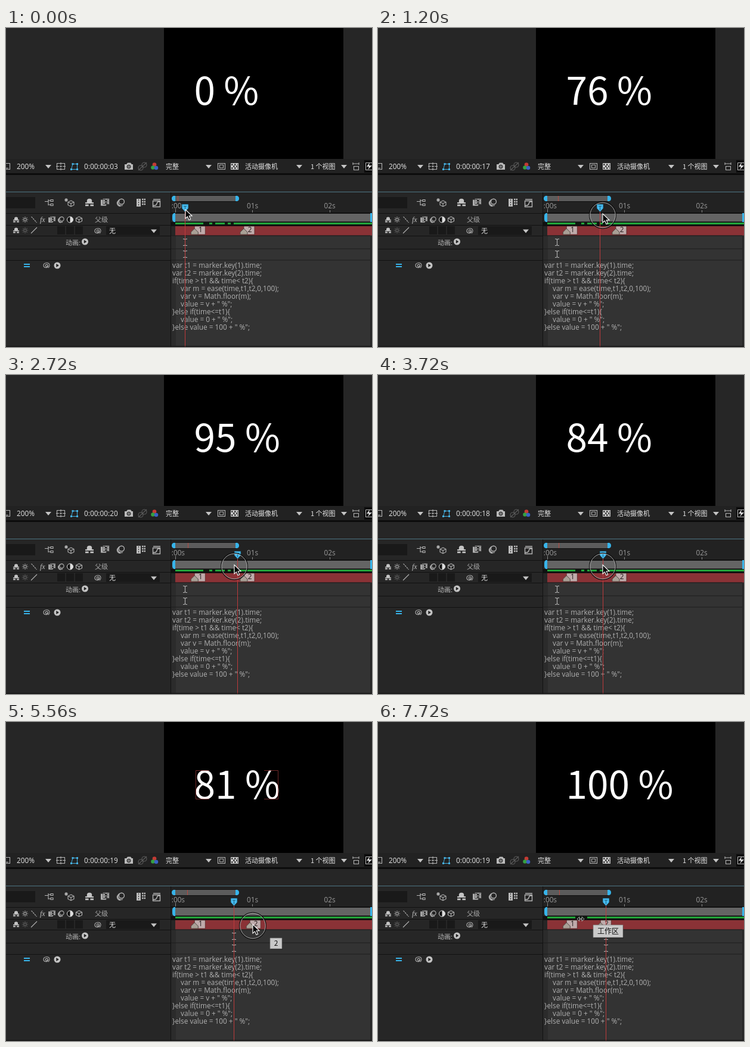
These frames come from a looping animation (614 by 536 pixels, 7760 ms). An HTML page:

```html
<!DOCTYPE html>
<html lang="zh">
<head>
<meta charset="utf-8">
<title>Marker driven counter</title>
<style>
html, body { margin: 0; width: 100%; height: 100%; overflow: hidden; background: #262626; }
svg { display: block; width: 614px; height: 536px; }
text { white-space: pre; }
.ui { font: 11.8px "Open Sans", "Noto Sans CJK SC", sans-serif; }
.cjk { font: 11px "Noto Sans CJK SC", sans-serif; }
.big { font: 64px "Noto Sans CJK SC", sans-serif; }
#bar text { font-weight: 500; }
.line { fill: none; stroke: #b4b4b4; stroke-width: 1.1; }
</style>
</head>
<body>
<svg id="stage" viewBox="0 0 614 536" xmlns="http://www.w3.org/2000/svg">
  <defs>
    <path id="down" d="M-5 -2.5H5L0 3.5Z" fill="#c4c4c4"/>
    <path id="shy" d="M-3 0V-2Q-3 -4.5 0 -4.5T3 -2V0H5V1.5H-5V0ZM-5 2.5H-1V4.5H-5ZM1 2.5H5V4.5H1Z" fill="#c4c4c4"/>
    <g id="sun" class="line"><circle r="2.2"/><path d="M0 -5V-3.6M0 5V3.6M-5 0H-3.6M5 0H3.6M-3.5 -3.5L-2.6 -2.6M3.5 3.5L2.6 2.6M-3.5 3.5L-2.6 2.6M3.5 -3.5L2.6 -2.6"/></g>
    <path id="slash" d="M-5 5L5 -5" class="line"/>
    <g id="film"><path d="M-6 -4H2V5H-6ZM-3 -5.500H6V3H-3Z" fill="#bcbcbc" stroke="#262626" stroke-width=".6"/><path d="M-1 -4.500V3M4 -4.500V3" stroke="#262626" stroke-dasharray="1.5 1.5"/><path d="M0 -3.500H3V-1H0ZM0 0H3V2H0Z" fill="#262626"/></g>
    <g id="blur" class="line"><circle cx="1.5" cy="-1" r="3.6"/><path d="M-1 -4A4 4 0 1 0 3 4M-3 -2A4 4 0 0 0 0 5"/></g>
    <path id="cube" d="M0 -5L5 -2.5V2.5L0 5L-5 2.5V-2.5ZM-5 -2.5L0 0L5 -2.5M0 0V5" class="line"/>
    <path id="spiral" d="M1.8 .5A1.8 1.8 0 1 1 0 -1.700Q3 -1.700 2.500 1.500C2 4.500 -5 4.500 -5 0C-5 -5 4.500 -6 5 -.5Q5 2.500 3 4" class="line"/>
    <g id="play"><circle r="5.5" fill="#c4c4c4"/><path d="M-1.7 -3L2.8 0L-1.7 3Z" fill="#222"/></g>
    <path id="beam" d="M-3.5 -5.5H-1.5L0 -4.5L1.5 -5.5H3.5M0 -4.7V4.7M-3.5 5.5H-1.5L0 4.5L1.5 5.5H3.5" class="line"/>
    <g id="marker">
      <path d="M0 -9H18V5H0Z" fill="#bfabab" stroke="#4a2222" stroke-width=".7"/>
      <path d="M-6 5V1L0 -5L6 1V5Z" fill="#a9a096" stroke="#514843"/>
    </g>
  </defs>

  <!-- viewer -->
  <path fill="#262626" d="M0 0H614V536H0Z"/>
  <path fill="#000" d="M265 0H566V220H265Z"/>
  <text id="count" class="big" x="315.5" y="129" fill="#fff"></text>
  <path id="bounds" d="M341 81.5H318.5V129.5H341M433 81.5H456.5V129.5H433" fill="none" stroke="#8c3434" stroke-width=".8"/>

  <!-- viewer toolbar -->
  <path fill="#222" d="M0 220H614V245H0Z"/>
  <path fill="#0c0c0c" d="M0 244H614V247H0ZM601 222H614V243H601Z"/>
  <path d="M0 275.5H614" stroke="#4c7483"/>
  <g class="line">
    <path d="M-1 227.500H6.500V237.500H-1M0 235.500H4"/>
    <path d="M85.500 227.500H98.500V237.500H85.500ZM92 226V230M92 235V239M84 232.500H89M95 232.500H100M90 232.500H94M92 231V234"/>
    <path d="M355.500 227.500H367.500V237.500H355.500ZM358.500 230H364.500V235H358.500Z"/>
    <path d="M582 228H592M582 226V230M592 226V230M583.500 232.500H591.500V238.500H583.500Z"/>
    <path d="M603.500 226.500H614M603.500 226.500V238.500H614"/>
  </g>
  <path d="M109.500 237.500L112 228.500H119.500V237.500Z" fill="none" stroke="#45afe0"/>
  <path d="M108 236H111V239H108ZM118 236H121V239H118ZM118 227H121V230H118ZM110.500 227H113.500V230H110.500Z" fill="#45afe0"/>
  <path d="M199 229H202L204 226.500H209L211 229H213V238H199Z" fill="#bbb"/>
  <circle cx="206" cy="233" r="3" fill="#777" stroke="#222"/>
  <g class="line" opacity=".4"><circle cx="226" cy="235" r="4"/><circle cx="232" cy="230" r="4"/><path d="M222 239L236 226"/></g>
  <circle cx="249" cy="229.500" r="3.300" fill="#c43a34"/><circle cx="246.500" cy="234.500" r="3.300" fill="#36a041"/><circle cx="252" cy="235" r="3.300" fill="#3b61c4"/>
  <path d="M377 227H390V238H377Z" fill="#ccc"/><path d="M378 229.500H389M381 232.500H389M378 235.500H389" stroke="#333" stroke-width="2.500" stroke-dasharray="2.500 2.500"/>
  <path d="M610 226L605 233H609L607 238L614 231H609Z" fill="#ddd"/>
  <g id="bar"></g>

  <!-- timeline -->
  <path fill="#222" d="M277 277H614V312H277Z"/>
  <path fill="#2b2b2b" d="M277 349H285V534H277Z"/>
  <path fill="#333" d="M285 349H611V534H285Z"/>
  <path fill="#5c5c5c" d="M284 282H386V291H284Z"/>
  <path d="M284 281.500H386M284 291.500H386" stroke="#111"/>
  <path fill="#37b4ea" d="M284 282V291H281Q278 290 278 286.500T281 282ZM385 282V291H388Q391 290 391 286.500T388 282Z"/>
  <path id="mini" stroke="#b8483f" d="M0 282V291"/>
  <path d="M284.500 304V310M413.500 306V310M543.500 306V310" stroke="#888"/>
  <g id="ruler"></g>
  <path fill="#111" d="M277 310H614V312H277ZM277 326H614V333H277Z"/>
  <path fill="#646464" d="M284 312H611V325H284Z"/>
  <path fill="#37b4ea" d="M284 311V326H282Q279 325 279 321V316Q279 312 282 311ZM611 311H614V326H611Z"/>
  <path d="M284 328.500H614" stroke="#22a53a" stroke-width="3"/>
  <path id="gaps" stroke="#0d1a0f" stroke-width="3"/>
  <path fill="#8a3236" d="M284 333H614V348.500H284Z"/>
  <path d="M277 349H611M277 371H611M277 390H611" stroke="#1c1c1c"/>
  <g id="code"></g>
  <use id="beamTop" href="#beam"/><use id="beamLow" href="#beam"/>
  <use href="#marker" x="316.300" y="342"/><text class="ui" x="323" y="342.500" fill="#221818">1</text>
  <g id="second"><use href="#marker"/><text class="ui" x="6.700" y=".5" fill="#221818">2</text></g>
  <g id="head">
    <path d="M0 308V536" stroke="#be3a3c"/>
    <path d="M-5.500 296H5.500V303L0 309L-5.500 303Z" fill="#45b9ed" stroke="#163747" stroke-width=".7"/>
    <path d="M-2.500 299.500H2.500M0 299.500V306" stroke="#206683" fill="none"/>
  </g>

  <!-- layer columns -->
  <path fill="#262626" d="M0 277H276V534H0Z"/>
  <path fill="#191919" d="M0 284H49V303H0ZM86 333H99V347H86ZM101 333H114V347H101ZM116 333H129V347H116ZM168 333H258V348H168Z"/>
  <path d="M0 311.500H276M0 331.500H276M0 349.500H276M0 371.500H276M0 390.500H276M276.500 276V536M0 535H614" stroke="#111" fill="none"/>
  <g class="line">
    <path d="M65 291.500H71M71 288V298M71 290H75M71 297H75M75 288.500H79V291.500H75ZM75 295.500H79V298.500H75Z"/>
    <path d="M246.500 290.500H258.500V300.500H246.500ZM247 298Q252 299 253 295T258 292M247 288H259" stroke-width="1.4"/>
    <path d="M101 286V292M98 289H104M99 287L103 291M103 287L99 291"/>
  </g>
  <use href="#cube" x="109" y="295"/>
  <use href="#shy" transform="translate(140 293) scale(1.400)"/>
  <use href="#film" transform="translate(166 293) scale(1.200)"/>
  <use href="#blur" transform="translate(192 293) scale(1.250)"/>
  <path d="M219 287H226V300H219Z" fill="#bbb"/><path d="M222.500 288V300" stroke="#262626" stroke-dasharray="2 2"/>
  <path d="M228 288H234M228 292H234M228 296H234" stroke="#bbb" stroke-width="2.500" stroke-dasharray="2.500 1"/>
  <use href="#shy" x="17" y="322"/><use href="#sun" x="32" y="322"/><path d="M42.500 317L51.500 327" class="line" stroke-dasharray="3 1"/>
  <text x="57" y="326" fill="#c4c4c4" font-size="12" font-style="italic" font-family="Liberation Serif, serif">fx</text>
  <use href="#film" x="77" y="322"/><use href="#blur" x="92" y="322"/>
  <circle cx="107.500" cy="322" r="5" fill="#111" stroke="#ddd"/><path d="M107.500 317A5 5 0 0 1 107.500 327Z" fill="#ddd"/>
  <use href="#cube" x="122.500" y="322"/>
  <use href="#shy" x="17" y="340"/><use href="#sun" x="32" y="340" opacity=".45"/><use href="#slash" x="47" y="340"/>
  <use href="#spiral" x="154" y="341"/><use href="#down" x="248" y="341"/>
  <use href="#play" x="132.500" y="359"/><use href="#play" x="86" y="399"/><use href="#spiral" x="68" y="399"/>
  <path d="M30 397H40M30 401H40" stroke="#37b4ea" stroke-width="2"/>
  <g id="columns"></g>

  <!-- pointer and hints -->
  <g id="tip"><path id="tipShadow" fill="#000" opacity=".35" transform="translate(1 1.500)"/><path id="tipBox" fill="#c9c9c9" stroke="#777" stroke-width=".7"/><text id="tipText" class="cjk" font-weight="500" fill="#111" text-anchor="middle"></text></g>
  <g id="pointer">
    <g id="ring" fill="none"><circle cy="2.500" r="22.300" stroke="#0a0a0a" stroke-width="1.200"/><circle cy="2.500" r="21.200" stroke="#b4b4b4" stroke-width=".9"/></g>
    <path id="arrow" d="M0 0V15L3.500 11.800L6 17.500L8.600 16.400L6.200 10.800H11Z" fill="#000" stroke="#fff" stroke-width="1.100"/>
    <g id="resize"><path d="M-6 0L-2 -3.500V3.500ZM6 0L2 -3.500V3.500Z" fill="#000" stroke="#ddd" stroke-width=".8"/><path d="M-2 0H2" stroke="#eee"/></g>
  </g>
</svg>
<script>
const LOOP = 7760, STEP = 40;
const START = 285.6, FRAME_WIDTH = 5.12, FIRST_MARKER = 6;
const DRAG_HEAD = [240, 4000], DRAG_MARKER = [4920, 7040];
const $ = id => document.getElementById(id);
const timeX = frame => START + frame * FRAME_WIDTH;
const within = (t, [from, to]) => t >= from && t < to;
const show = (id, on) => $(id).setAttribute("visibility", on ? "inherit" : "hidden");
const move = (id, x, y = 0) => $(id).setAttribute("transform", `translate(${x} ${y})`);

function label(parent, x, y, content, fill, kind = "ui") {
  const node = document.createElementNS("http://www.w3.org/2000/svg", "text");
  const attrs = { x, y, fill, class: kind };
  for (const name in attrs) node.setAttribute(name, attrs[name]);
  node.textContent = content;
  $(parent).append(node);
  return node;
}

function arrowDown(x) {
  const node = document.createElementNS("http://www.w3.org/2000/svg", "use");
  node.setAttribute("href", "#down");
  node.setAttribute("x", x);
  node.setAttribute("y", 232.5);
  $("bar").append(node);
}

label("bar", 18, 237, "200%", "#e4e4e4");
const clock = label("bar", 131, 237, "", "#e4e4e4");
label("bar", 268, 237, "完整", "#e8e8e8", "cjk");
label("bar", 401, 237, "活动摄像机", "#e8e8e8", "cjk");
label("bar", 511, 237, "1 个视图", "#e8e8e8", "cjk");
[71, 340, 492, 567].forEach(arrowDown);
label("ruler", 271, 302.5, "0:00s", "#999");
label("ruler", 404, 302.5, "01s", "#999");
label("ruler", 533.5, 302.5, "02s", "#999");
label("columns", 149, 326, "父级", "#aaa", "cjk");
label("columns", 173, 345, "无", "#ddd", "cjk");
label("columns", 100, 365, "动画:", "#b8b8b8", "cjk");

const script = `var t1 = marker.key(1).time;
var t2 = marker.key(2).time;
if(time > t1 && time< t2){
\tvar m = ease(time,t1,t2,0,100);
\tvar v = Math.floor(m);
\tvalue = v + " %";
}else if(time<=t1){
\tvalue = 0 + " %";
}else value = 100 + " %";`;
script.split("\n").forEach((row, i) =>
  label("code", row[0] === "\t" ? 293 : 279, 403 + i * 13, row.trim(), "#b0b0b0"));

// time, pointer x, pointer y, playhead frame, second marker frame
const poses = [
  [0, 301, 305, 3, 22], [240, 301, 305, 3, 22], [1200, 377, 312, 17, 22],
  [1520, 388, 317, 19.6, 22], [2000, 362, 319, 15, 22], [2400, 372, 319, 17, 22],
  [2720, 383, 319, 20, 22], [2920, 399, 319, 22, 22], [3120, 399, 319, 22, 22],
  [3240, 390, 319, 20.4, 22], [3720, 377, 319, 18, 22], [3960, 383, 320, 19, 22],
  [4160, 383, 320, 19, 22], [4680, 404, 339, 19, 22], [4920, 404, 340, 19, 22],
  [5500, 414, 340, 19, 24], [5800, 414, 340, 19, 24], [6400, 393, 339, 19, 21],
  [6900, 373, 339, 19, 17], [7100, 373, 339, 19, 17], [7480, 340, 331, 19, 17],
  [LOOP, 340, 331, 19, 17]
];

const smooth = u => u * u * (3 - 2 * u);

function poseAt(t) {
  const i = poses.findIndex(p => p[0] > t);
  const a = poses[i - 1], b = poses[i];
  const u = smooth((t - a[0]) / (b[0] - a[0]));
  return a.slice(1).map((v, k) => v + (b[k + 1] - v) * u);
}

function percent(frame, last) {
  const u = (frame - FIRST_MARKER) / (last - FIRST_MARKER);
  return Math.floor(100 * smooth(Math.max(0, Math.min(1, u))));
}

function hint(x, y, w, h, content) {
  for (const id of ["tipShadow", "tipBox"]) $(id).setAttribute("d", `M${x} ${y}h${w}v${h}h${-w}Z`);
  $("tipText").setAttribute("x", x + w / 2);
  $("tipText").setAttribute("y", y + h / 2 + 4.3);
  $("tipText").textContent = content;
}

function render(t) {
  const [x, y, head, mark] = poseAt(t);
  const frame = Math.round(head), last = Math.round(mark);
  const scrubbed = t >= DRAG_HEAD[1];
  const resizing = t >= 7400;

  $("count").textContent = percent(frame, last) + " %";
  clock.textContent = "0:00:00:" + String(frame).padStart(2, "0");
  show("bounds", t >= 4200 && t < DRAG_MARKER[1]);
  move("head", Math.floor(timeX(frame)) + .5);
  move("mini", 285.5 + frame);
  move("second", timeX(last) + .7, 342);
  const beamX = scrubbed ? 382.5 : 300.5;
  move("beamTop", beamX, 360);
  move("beamLow", beamX, 380);
  $("gaps").setAttribute("d", !scrubbed
    ? "M331 328.5H341M346 328.5H351M367 328.5H372M377 328.5H382"
    : t >= 6800 ? "M331 328.5H351" : "");

  move("pointer", x, y);
  show("ring", within(t, DRAG_HEAD) || within(t, DRAG_MARKER));
  show("arrow", !resizing);
  show("resize", resizing);
  const workArea = t >= 7560;
  show("tip", workArea || within(t, [5280, 6880]));
  if (workArea) hint(361, 341, 50, 21, "工作区");
  else hint(443, 363, 20, 18, "2");
  $("tipText").style.fontSize = "12px";
}

const begin = performance.now();
function tick() {
  const t = (performance.now() - begin) % LOOP;
  render(Math.floor(t / STEP) * STEP);
  requestAnimationFrame(tick);
}
tick();
</script>
</body>
</html>
```
